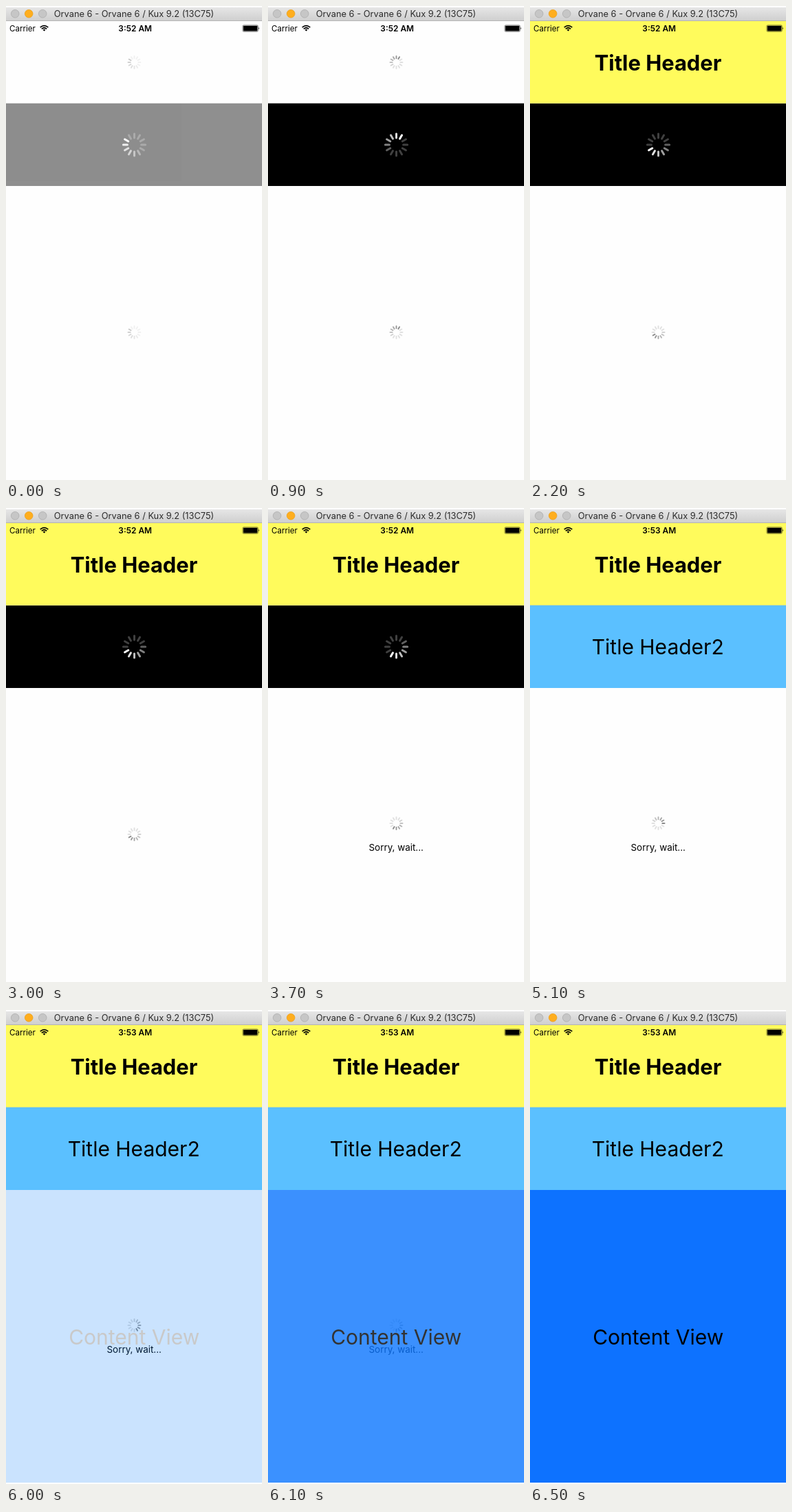
Write an HTML page that moves like this. It is 372 px wide and 690 px high and loops after 6.6 s.

```html
<!DOCTYPE html>
<html lang="en">
<head>
<meta charset="utf-8">
<title>Loading views</title>
<style>
  html, body { margin: 0; width: 100%; height: 100%; overflow: hidden; background: #fefefe; }
  svg { display: block; width: 372px; height: 690px; font-family: Inter, Roboto, sans-serif; }
  text { text-anchor: middle; }
  .big { font-size: 30px; }
</style>
</head>
<body>
<svg viewBox="0 0 372 690">
  <defs>
    <linearGradient id="chrome" x2="0" y2="1">
      <stop stop-color="#e6e6e6"/>
      <stop offset="1" stop-color="#cecece"/>
    </linearGradient>
  </defs>

  <g id="loader1"></g>
  <g id="loader2"><rect y="141.7" width="372" height="120.3"/></g>
  <g id="loader3"></g>
  <text id="label" x="186.2" y="499" font-size="13.4">Sorry, wait...</text>

  <g id="header1">
    <rect y="22" width="372" height="119.7" fill="#fffb5c"/>
    <text x="186" y="94" font-size="30.9" font-weight="700">Title Header</text>
  </g>
  <g id="header2">
    <rect y="141.7" width="372" height="120.3" fill="#5bc0ff"/>
    <text class="big" x="185.7" y="213.4">Title Header2</text>
  </g>
  <g id="content">
    <rect id="sheet" y="262" width="372" height="426"/>
    <text class="big" x="186.2" y="487">Content View</text>
  </g>

  <!-- window title bar -->
  <rect y="2" width="372" height="20" fill="url(#chrome)"/>
  <rect y="21" width="372" height="1" fill="#b4b4b4"/>
  <g fill="#c6c6c6" stroke="#adadad" stroke-width=".8">
    <circle cx="13.2" cy="11.2" r="5.8"/>
    <circle cx="33.2" cy="11.2" r="5.8" fill="#ffae1e" stroke="#eb9f18"/>
    <circle cx="53.2" cy="11.2" r="5.8"/>
  </g>
  <text x="186" y="16.3" font-size="12.85" fill="#2c2c2c">Orvane 6 - Orvane 6 / Kux 9.2 (13C75)</text>

  <!-- status bar -->
  <text x="5" y="36.7" font-size="11.6" style="text-anchor:start">Carrier</text>
  <g fill="none" stroke="#000" stroke-width="1.7">
    <path d="M49.7 31.2Q55.5 26.2 61.3 31.2M51.8 33.3Q55.5 30.2 59.2 33.3"/>
    <path d="M53.6 34.6Q55.5 33 57.4 34.6L55.5 36.8Z" fill="#000" stroke="none"/>
  </g>
  <text id="clock" x="187.7" y="36.8" font-size="11.9" font-weight="600"></text>
  <rect x="343.9" y="27.9" width="22.4" height="9.4" rx="1.6" fill="none" stroke="#000" stroke-width=".6" stroke-opacity=".8"/>
  <rect x="344.8" y="28.8" width="20.6" height="7.6" rx=".8"/>
  <path d="M367 30.8q1.6 1.8 0 3.6z"/>
</svg>
<script>
const $ = id => document.getElementById(id);
const LOOP = 6600, STEP = 100, FADE = 240, SPOKES = 12;

function makeSpinner(parent, y, inner, outer, width, color) {
  const spokes = [];
  for (let i = 0; i < SPOKES; i++) {
    const line = document.createElementNS('http://www.w3.org/2000/svg', 'line');
    const attrs = {
      x1: 186.5, x2: 186.5, y1: y - inner - width / 2, y2: y - outer + width / 2,
      stroke: color, 'stroke-width': width, 'stroke-linecap': 'round',
      transform: `rotate(${i * 360 / SPOKES} 186.5 ${y})`
    };
    for (const key in attrs) line.setAttribute(key, attrs[key]);
    $(parent).append(line);
    spokes.push(line);
  }
  return spokes;
}

const spinners = [
  makeSpinner('loader1', 82, 4.8, 10, 1.9, '#8a8a8a'),
  makeSpinner('loader2', 202, 8.6, 17.6, 3, '#fff'),
  makeSpinner('loader3', 475, 4.8, 10, 1.9, '#8a8a8a')
];

// smooth 0..1 ramp beginning at start
function ramp(t, start) {
  const p = Math.min(1, Math.max(0, (t - start) / FADE));
  return p * p * (3 - 2 * p);
}

function show(id, opacity) { $(id).setAttribute('opacity', opacity); }

function draw(t) {
  // the wheel turns a little faster while the loaders appear
  const head = Math.floor(25.3 + (t - 900) * (t < 900 ? 1 / 60 : 0.0149));
  for (const spokes of spinners) {
    spokes.forEach((spoke, i) => {
      const age = (head - i + 5 * SPOKES) % SPOKES;
      spoke.setAttribute('opacity', Math.max(0.25, 1 - age * 0.125));
    });
  }

  const appear = ramp(t, -110);
  for (const id of ['loader1', 'loader2', 'loader3']) show(id, appear);

  const wait = ramp(t, 3360);
  $('loader3').setAttribute('transform', `translate(0 ${-16 * wait})`);
  $('label').setAttribute('transform', `translate(0 ${16 * (1 - wait)})`);
  show('label', wait);

  show('header1', t >= 2200 ? 1 : 0);
  show('header2', t >= 4000 ? 1 : 0);

  // the blue deepens slightly as the sheet becomes opaque
  const cover = ramp(t, 5930);
  show('content', cover);
  $('sheet').setAttribute('fill', `rgb(${13 * cover}, ${128 - 14 * cover}, 255)`);

  $('clock').textContent = t < 4300 ? '3:52 AM' : '3:53 AM';
}

function tick() {
  draw(Math.floor(performance.now() % LOOP / STEP) * STEP);
  requestAnimationFrame(tick);
}
tick();
</script>
</body>
</html>
```
